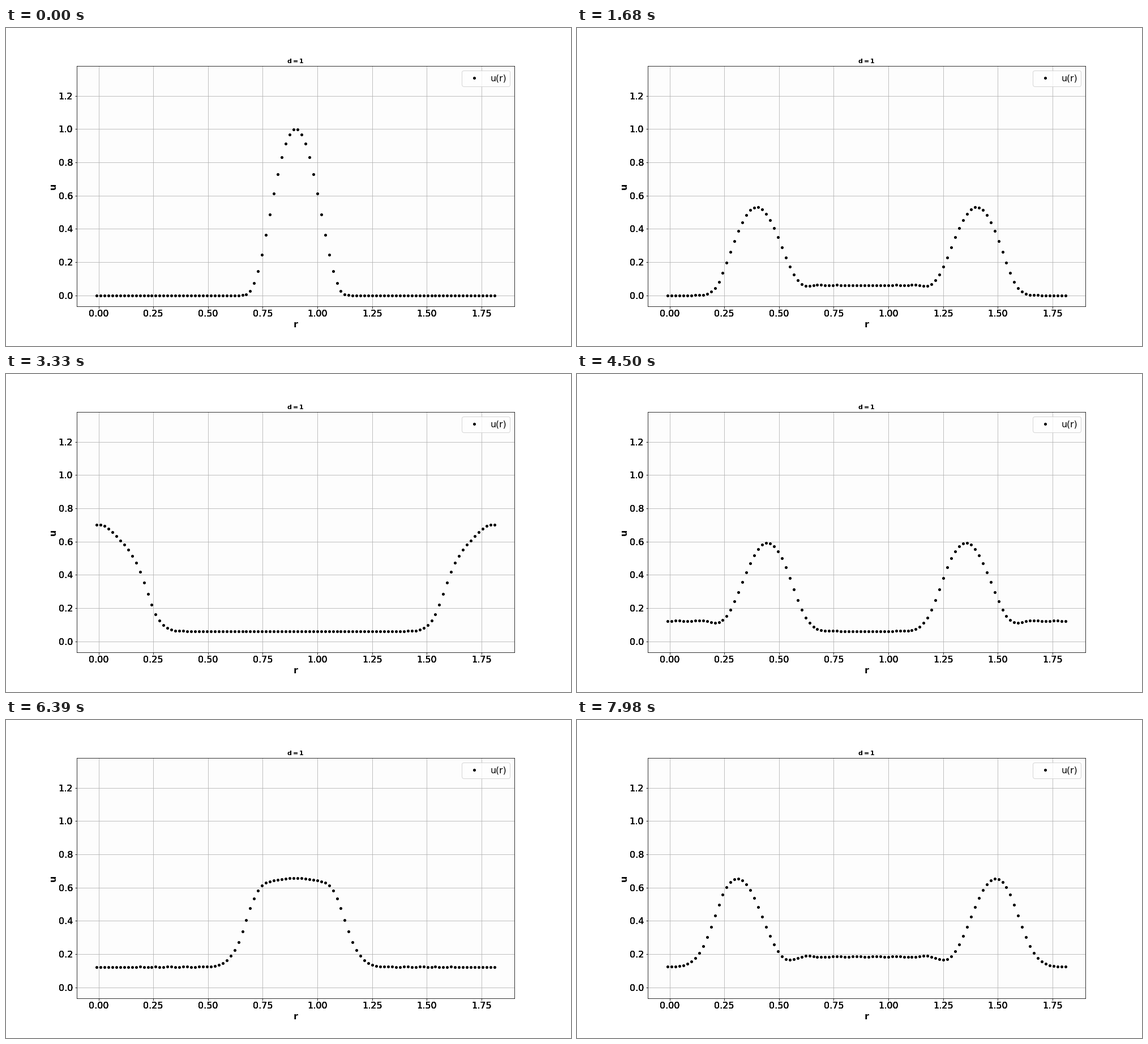
Recreate the animation shown at these times as a matplotlib script. Size 998 px wide and 561 px high, loop 8000 ms.

```python
import numpy as np
import matplotlib.pyplot as plt
from matplotlib.animation import FuncAnimation

W, H, DPI = 998, 561, 72
FRAMES, LOOP = 267, 8000
LENGTH, CELLS = 1.8, 100
COURANT = 0.5
PUSH = 0.534      # initial velocity, relative to the bump height
FONT = 16
TICK_PAD = 6.5

plt.rcParams["font.family"] = "DejaVu Sans"
plt.rcParams["mathtext.fontset"] = "dejavusans"


def bump(r, centre=0.9, width=0.3):
    """Smooth hump of height one that vanishes beyond the given width."""
    d2 = np.minimum((r - centre) ** 2, width ** 2 - 1e-9)
    return np.exp(-4 * d2 / (width ** 2 - d2))


def solve_wave(r, h):
    """Leapfrog solution of the wave equation with reflecting ends."""
    dt = COURANT * h
    now = bump(r)
    before = now * (1 - PUSH * dt)
    states = [now]
    for _ in range(FRAMES - 1):
        after = np.empty_like(now)
        bend = now[2:] - 2 * now[1:-1] + now[:-2]
        after[1:-1] = 2 * now[1:-1] - before[1:-1] + COURANT ** 2 * bend
        after[0], after[-1] = after[1], after[-2]
        before, now = now, after
        states.append(now)
    return states


h = LENGTH / CELLS
r = (np.arange(CELLS + 2) - 0.5) * h
states = solve_wave(r, h)

fig = plt.figure(figsize=(W / DPI, H / DPI), dpi=DPI, facecolor="white")
ax = fig.add_axes([0.125, 0.125, 0.775, 0.755], facecolor="#fdfdfd")
ax.set_xlim(-0.1004, 1.9004)
ax.set_ylim(-0.0659, 1.3791)
xticks = np.arange(8) * 0.25
yticks = np.arange(7) * 0.2
ax.set_xticks(xticks)
ax.set_yticks(yticks)
ax.tick_params(labelbottom=False, labelleft=False)
ax.grid(True, color="#b0b0b0", linewidth=0.8)

# Tick labels are laid over each other, which hardens their edges.
xform, xva, xha = ax.get_xaxis_text1_transform(TICK_PAD)
yform, yva, yha = ax.get_yaxis_text1_transform(TICK_PAD)
for _ in range(4):
    for x in xticks:
        ax.text(x, 0, f"{x:.2f}", transform=xform, va=xva, ha=xha,
                fontsize=FONT)
    for y in yticks:
        ax.text(0, y, f"{y:.1f}", transform=yform, va=yva, ha=yha,
                fontsize=FONT)


def label(x, y, text, **style):
    fig.text(x / W, 1 - y / H, text, ha="center", **style)


label(511.5, 62, r"$\mathbf{d=1}$", va="baseline", fontsize=11)
label(511.5, 528, "r", va="baseline", fontsize=FONT, weight="bold")
label(83, 279.3, "u", va="center", fontsize=FONT, weight="bold", rotation=90)

dots, = ax.plot(r, states[0], "o", color="black", markersize=4,
                markeredgewidth=1, label="u(r)")
ax.legend(loc="upper right", fontsize=15.6)


def update(i):
    dots.set_ydata(states[i])
    return dots,


anim = FuncAnimation(fig, update, frames=FRAMES, interval=LOOP / FRAMES,
                     init_func=lambda: update(0), repeat=True,
                     repeat_delay=0, blit=False)
plt.show()
```
